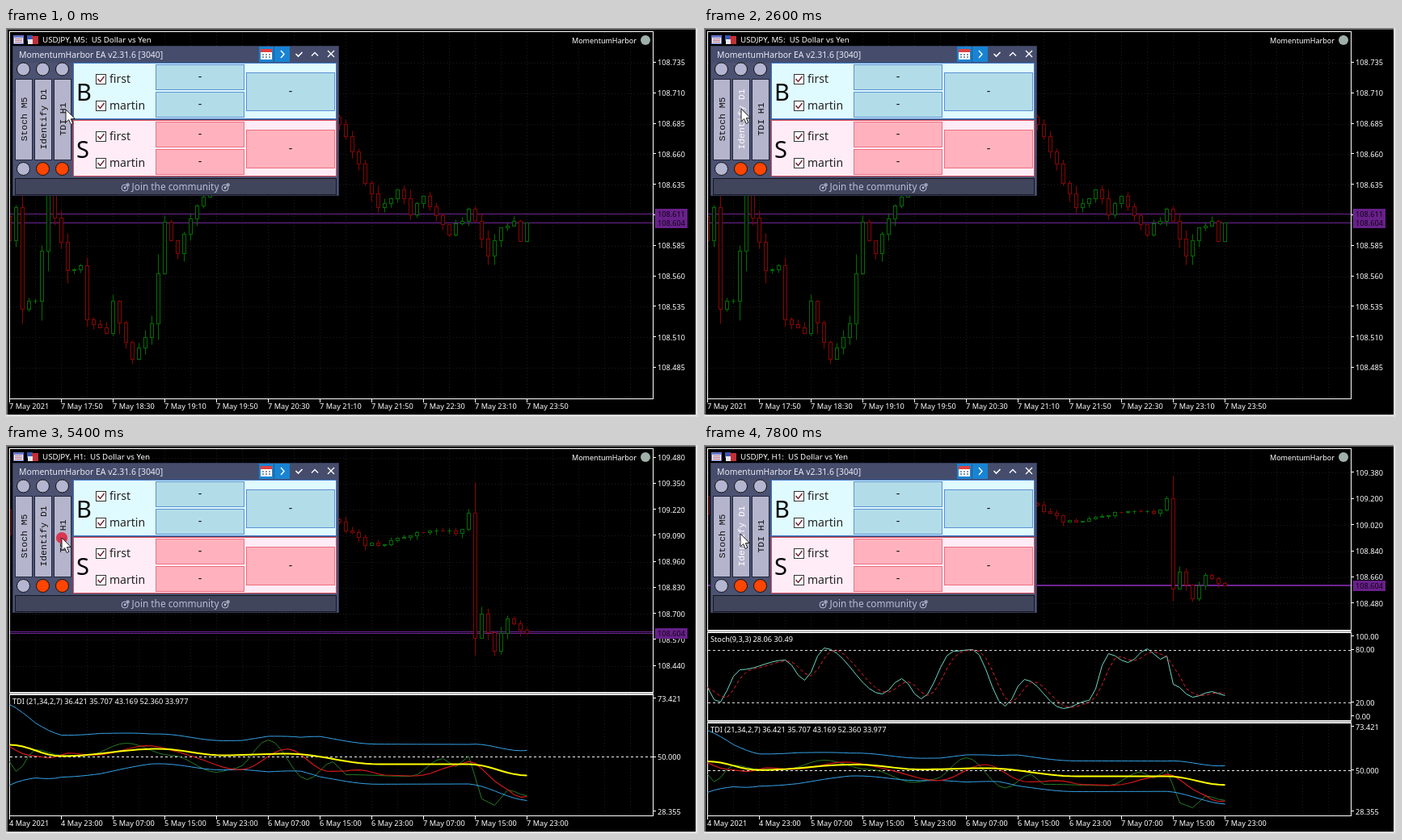
Write an HTML page with a canvas that moves like this. It is 856 by 482 pixels and loops after 8000 ms.

```html
<!DOCTYPE html>
<html lang="en">
<head>
<meta charset="utf-8">
<title>Indicator tabs</title>
<style>
html, body { margin: 0; width: 100%; height: 100%; overflow: hidden; background: #000; }
canvas { display: block; }
</style>
</head>
<body>
<canvas id="stage" width="856" height="482"></canvas>
<script>
const ctx = document.getElementById('stage').getContext('2d');
const LOOP = 8000, STEP = 200, RIGHT = 800, BOTTOM = 459, BARS = 81;
const BID = 108.604, ASK = 108.611;
const SANS = '"Noto Sans", "Open Sans", sans-serif';
const MONO = '"Liberation Mono", monospace';

const linear = k => k;
const wave = k => (1 - Math.cos(Math.PI * k)) / 2;

// One level per bar, eased between key points given as bar, level, bar, level ...
function curve(keys, ease = wave) {
  return Array.from({ length: BARS }, (_, bar) => {
    let i = 0;
    while (keys[i + 2] < bar) i += 2;
    const [b0, y0, b1, y1] = keys.slice(i, i + 4);
    return y0 + (y1 - y0) * ease((bar - b0) / (b1 - b0));
  });
}
const average = (ys, n, before = ys[0]) => ys.map((_, i) => {
  let sum = 0;
  for (let k = 0; k < n; k++) sum += ys[i - k] ?? before;
  return sum / n;
});

function makeCandles(keys, seed) {
  const random = () => (seed = seed * 16807 % 2147483647) / 2147483647;
  const closes = curve(keys, linear).map((y, bar) => {
    const isKey = keys.some((k, i) => i % 2 === 0 && k === bar);
    return isKey ? y : y + (random() - 0.5) * 10;
  });
  return closes.map((close, i) => {
    const open = closes[i - 1] ?? close - 30;
    const reach = 5 + Math.abs(close - open) * 0.35;
    const high = Math.min(open, close) - random() * reach;
    const low = Math.max(open, close) + random() * reach;
    return { open, close, high, low };
  });
}

// Levels are pixels on a scale of `unit` pixels per price unit, with the bid at `bid`
const charts = {
  M5: {
    title: 'M5', bid: 241, unit: 1512, start: Date.UTC(2021, 4, 7, 17, 10), minutes: 40,
    candles: makeCandles([0, 263, 1, 222, 2, 348, 4, 338, 6, 205, 9, 300, 11, 294, 12, 361, 15, 378, 16, 338, 19, 410,
      22, 366, 24, 240, 26, 279, 28, 236, 40, 60, 51, 119, 57, 222, 60, 200, 62, 231, 64, 208, 68, 256, 71, 224, 74, 282, 76, 247, 78, 239, 79, 264, 80, 241], 7)
  },
  D1: {
    title: 'Daily', bid: 151, unit: 57.14, start: Date.UTC(2021, 0, 15), minutes: 0,
    candles: makeCandles([0, 424, 4, 441, 7, 434, 10, 375, 13, 355, 15, 330, 17, 383, 20, 365, 22, 297, 26, 350,
      29, 290, 33, 243, 36, 180, 51, 84, 53, 38, 55, 48, 58, 90, 62, 108, 66, 175, 70, 192, 72, 147, 76, 108, 79, 124, 80, 151], 11)
  },
  H1: {
    title: 'H1', bid: 233, unit: 248, start: Date.UTC(2021, 4, 4, 15), minutes: 480,
    candles: makeCandles([0, 110, 51, 95, 55, 124, 59, 118, 65, 106, 70, 104, 71, 84, 72, 239, 73, 209, 75, 255, 77, 215, 80, 233], 5)
  }
};
const trend = average(charts.D1.candles.map(c => c.close), 4);

const stoch = {
  M5: { top: 309, height: 150, caption: '53.79 54.75',
    main: curve([0, 442, 3, 446, 9, 367, 14, 438, 17, 422, 19, 436, 24, 313, 26, 327, 28, 317, 37, 410, 40, 381, 43, 419,
      48, 349, 51, 371, 55, 450, 58, 450, 61, 431, 63, 430, 64, 406, 66, 412, 67, 440, 69, 436, 72, 386, 75, 446, 78, 370, 79, 382, 80, 378]) },
  H1: { top: 232, height: 109, caption: '28.06 30.49',
    main: curve([0, 300, 1.5, 320, 5, 278, 12, 266, 15, 291, 18, 251, 27, 308, 30, 289, 33, 314, 38, 255, 41, 253,
      46, 323, 49, 290, 55, 326, 59, 316, 62, 258, 65, 269, 68, 252, 70, 265, 71, 261, 72, 296, 75, 312, 78, 305, 80, 310]) }
};

const rsi = curve([0, 392, 1, 404, 4, 377, 8, 384, 12, 384, 18, 369, 25, 384, 32, 405, 35, 400, 40, 365, 46, 414,
  50, 392, 52, 408, 62, 410, 67, 388, 69, 398, 71, 385, 73, 438, 75, 446, 77, 427, 80, 434]);
const base = curve([0, 371, 8, 385, 23, 376, 33, 384, 43, 382, 57, 395, 71, 395, 80, 409]);
const spread = curve([0, 50, 4, 34, 8, 26, 14, 25, 22, 18.5, 36, 18, 40, 22, 45, 21, 48, 25, 71, 24.5, 80, 31], linear);
const tdi = [
  ['#267a26', 1, rsi],
  ['#35a4ea', 1, base.map((y, i) => y - spread[i])],
  ['#35a4ea', 1, base.map((y, i) => y + spread[i])],
  ['#d01818', 1.2, average(rsi, 7, 370)],
  ['#ffff00', 2, base]
];

const scales = {
  M5full: { bid: 241, unit: 1512, top: 108.735, step: 0.025 },
  M5sub: { bid: 161, unit: 943, top: 108.765, step: 0.035 },
  D1full: { bid: 151, unit: 57.14, top: 111.06, step: 0.56 },
  H1full: { bid: 349, unit: 374, top: 109.4, step: 0.1 },
  H1sub: { bid: 233, unit: 248, top: 109.48, step: 0.13 },
  H1two: { bid: 174, unit: 180, top: 109.38, step: 0.18 }
};

const scenes = [
  { from: 0, name: 'M5', scale: 'M5full' },
  { from: 800, name: 'M5', scale: 'M5sub', stoch: true },
  { from: 1600, name: 'M5', scale: 'M5full' },
  { from: 3000, name: 'D1', scale: 'D1full', trend: true },
  { from: 3800, name: 'D1', scale: 'D1full' },
  { from: 4600, name: 'H1', scale: 'H1sub', tdi: true },
  { from: 5600, name: 'H1', scale: 'H1full' },
  { from: 6600, name: 'M5', scale: 'M5sub', stoch: true },
  { from: 7400, name: 'H1', scale: 'H1two', stoch: true, tdi: true }
];
const stops = [
  { arrive: 0, leave: 0, x: 74, y: 101 },
  { arrive: 600, leave: 1800, x: 18, y: 100 },
  { arrive: 2200, leave: 3800, x: 46, y: 100 },
  { arrive: 4400, leave: 5700, x: 69, y: 115 },
  { arrive: 6400, leave: 6680, x: 27, y: 115 },
  { arrive: 7150, leave: 7400, x: 69, y: 113 },
  { arrive: 7800, leave: LOOP, x: 45, y: 110 }
];
const clicks = [800, 1500, 2900, 3480, 4500, 5340, 6430, 7300];

function text(str, x, y, size = 9.2, color = '#fff', align = 'left', family = SANS) {
  ctx.font = `${size}px ${family}`;
  ctx.textAlign = align;
  ctx.fillStyle = color;
  ctx.fillText(str, x, y);
}
function box(x, y, w, h, fill, stroke) {
  ctx.fillStyle = fill;
  ctx.fillRect(x, y, w, h);
  if (!stroke) return;
  ctx.strokeStyle = stroke;
  ctx.lineWidth = 1;
  ctx.strokeRect(x + 0.5, y + 0.5, w - 1, h - 1);
}
function poly(points, color, width = 1, dash = []) {
  ctx.beginPath();
  for (let i = 0; i < points.length; i += 2) ctx.lineTo(points[i], points[i + 1]);
  ctx.strokeStyle = color;
  ctx.lineWidth = width;
  ctx.setLineDash(dash);
  ctx.stroke();
  ctx.setLineDash([]);
}
function disc(x, y, r, fill, stroke) {
  ctx.beginPath();
  ctx.arc(x, y, r, 0, 7);
  if (fill) { ctx.fillStyle = fill; ctx.fill(); }
  if (stroke) { ctx.strokeStyle = stroke; ctx.lineWidth = 1; ctx.stroke(); }
}
const barX = bar => 4.5 + bar * 8;
const snap = y => Math.round(y) + 0.5;
const level = (y, color, dash) => poly([5, snap(y), RIGHT, snap(y)], color, 1, dash);
const series = (ys, mapY, color, width, dash) =>
  poly(ys.flatMap((y, bar) => [barX(bar), mapY(y) + 0.5]), color, width, dash);

function axisLabel(str, y) {
  poly([RIGHT, snap(y) - 1, RIGHT + 4, snap(y) - 1], '#fff');
  text(str, 806, y + 3.5);
}

function drawCandles(chart, scale, bottom) {
  const mapY = y => snap(scale.bid + (y - chart.bid) * scale.unit / chart.unit);
  ctx.save();
  ctx.beginPath();
  ctx.rect(5, 5, RIGHT - 5, bottom - 5);
  ctx.clip();
  chart.candles.forEach(({ open, close, high, low }, bar) => {
    const x = barX(bar), top = mapY(Math.min(open, close));
    const height = mapY(Math.max(open, close)) - top;
    poly([x, mapY(high), x, mapY(low)], close < open ? '#046c04' : '#860606');
    ctx.fillStyle = '#000';
    ctx.fillRect(x - 2, top, 4, height);
    ctx.strokeRect(x - 2, top, 4, height);
  });
  ctx.restore();
}

function drawTrend() {
  for (let bar = 1; bar < BARS; bar++) {
    const y0 = trend[bar - 1], y1 = trend[bar];
    poly([barX(bar - 1), y0, barX(bar), y1], y1 < y0 ? '#00f' : '#f00', 3);
  }
}

function frame(top, bottom) {
  ctx.strokeStyle = '#fff';
  ctx.lineWidth = 1;
  ctx.strokeRect(4.5, top + 0.5, RIGHT - 4, bottom - top);
}
function subPane(top, bottom) {
  box(4, top - 2, RIGHT - 3, 2, '#bbb');
  frame(top, bottom);
}

function stochPane(data, top, bottom) {
  const height = bottom - top;
  const mapY = y => top + (y - data.top) * height / data.height;
  subPane(top, bottom);
  [80, 20].forEach(v => {
    const y = bottom - v / 100 * height;
    level(y, '#ddd', [3, 3]);
    axisLabel(v + '.00', y);
  });
  axisLabel('100.00', top + 5);
  axisLabel('0.00', bottom - 5);
  series(data.main, mapY, '#72d8c4');
  series(average(data.main, 3), mapY, '#e02030', 1, [4, 3]);
  text('Stoch(9,3,3) ' + data.caption, 8, top + 12);
}

function tdiPane(top, bottom) {
  const mapY = y => top + (y - 309) * (bottom - top) / 150;
  subPane(top, bottom);
  level(mapY(386), '#fff', [3, 3]);
  axisLabel('73.421', top + 5);
  axisLabel('50.000', mapY(386.5));
  axisLabel('28.355', bottom - 5);
  tdi.forEach(([color, width, ys]) => series(ys, mapY, color, width));
  text('TDI (21,34,2,7) 36.421 35.707 43.169 52.360 33.977', 8, top + 12);
}

// Labels stand eight bars apart; the daily chart counts weekdays only
function timeLabels({ start, minutes }) {
  const date = new Date(start);
  return Array.from({ length: 11 }, (_, i) => {
    const day = `${date.getUTCDate()} ${date.toLocaleString('en-US', { month: 'short', timeZone: 'UTC' })} `;
    const label = day + (i && minutes ? date.toISOString().slice(11, 16) : '2021');
    if (minutes) date.setTime(+date + minutes * 60000);
    else for (let n = 0; n < 8;) {
      date.setUTCDate(date.getUTCDate() + 1);
      if (date.getUTCDay() % 6) n++;
    }
    return label;
  });
}

function priceTag(price, y) {
  box(803, Math.round(y) - 6, 40, 13, '#68208a');
  text(price.toFixed(3), 806, y + 3.5, 9.2, '#100514');
}

function drawChart(scene) {
  const chart = charts[scene.name], scale = scales[scene.scale];
  const bottom = scene.stoch && scene.tdi ? 229 : scene.stoch || scene.tdi ? 306 : BOTTOM;
  const priceY = price => scale.bid + (BID - price) * scale.unit;
  for (let x = 36.5; x < RIGHT; x += 32) poly([x, 5, x, BOTTOM], '#1c1c1c', 1, [1, 3]);
  for (let price = scale.top; priceY(price) < bottom - 10; price -= scale.step) {
    level(priceY(price), '#1c1c1c', [1, 3]);
    axisLabel(price.toFixed(3), priceY(price));
  }
  if (scene.name !== 'D1') level(priceY(ASK), '#702494');
  level(scale.bid, '#702494');
  drawCandles(chart, scale, bottom);
  if (scene.trend) drawTrend();
  if (scene.name === 'M5') priceTag(ASK, priceY(ASK));
  priceTag(BID, scale.bid);

  frame(4, bottom);
  if (scene.stoch) stochPane(stoch[scene.name], bottom + 3, scene.tdi ? 341 : BOTTOM);
  if (scene.tdi) tdiPane(scene.stoch ? 344 : bottom + 3, BOTTOM);

  timeLabels(chart).forEach((label, i) => {
    const x = 4 + i * 64;
    poly([x + 0.5, BOTTOM, x + 0.5, BOTTOM + 5], '#fff');
    text(label, x, 472);
  });
  text(`USDJPY, ${chart.title}:\u00a0 US Dollar vs Yen`, 45, 18, 9.8);
  text('MomentumHarbor', 780, 19, 9, '#fff', 'right');
}

function cornerIcons() {
  box(9, 9, 13, 11, '#f4f4ff', '#6878c8');
  box(10, 10, 11, 2, '#6878c8');
  for (let y = 13.5; y < 19; y += 2) poly([11, y, 20, y], '#b06878');
  box(26, 9, 7, 7, '#3458b8');
  box(32, 10, 8, 10, '#c03038');
  box(27, 14, 6, 6, '#e8e8f0');
  disc(791, 15, 6, '#9fb0a8');
}

function checkbox(label, y) {
  box(111, y - 6, 13, 13, '#fff', '#333');
  poly([113.5, y, 116.5, y + 3.5, 121.5, y - 3], '#702030', 1.4);
  text(label, 128, y + 5, 14, '#222');
}

function section(letter, top, fill, edge, button, buttonEdge) {
  box(83, top, 326, 70, fill, edge);
  text(letter, 87, top + 47, 29, '#000');
  checkbox('first', top + 20);
  checkbox('martin', top + 53);
  [[185, 2, 32], [185, 36, 32], [297, 12, 48]].forEach(([x, dy, h]) => {
    box(x, top + dy, 110, h, button, buttonEdge);
    text('-', x + 55, top + dy + h / 2 + 4, 14, '#111', 'center');
  });
}

function joinIcon(x) {
  disc(x, 198, 4, null, '#b8bcd6');
  disc(x, 198, 1.4, '#b8bcd6');
  poly([x, 198, x + 5, 193, x + 5, 196, x + 2, 193, x + 5, 193], '#b8bcd6');
}

function panel(hovered) {
  box(8, 22, 404, 186, '#4c5272', '#343a56');
  box(9, 23, 402, 20, '#464d6c');
  text('MomentumHarbor EA v2.31.6 [3040]', 16, 37, 10.4, '#e8eaf4');
  box(313, 23, 18, 19, '#1784d4');
  box(315, 26, 14, 13, '#fff');
  box(315, 26, 14, 4, '#e04040');
  for (let i = 0; i < 6; i++) box(317 + i % 3 * 4, 32 + (i / 3 | 0) * 3, 2, 2, '#8898a8');
  box(332, 23, 19, 19, '#1784d4');
  poly([340, 28, 344, 32.5, 340, 37], '#fff', 1.4);
  poly([358.5, 32, 361.5, 35, 366.5, 30], '#fff', 1.6);
  poly([378, 34.5, 382, 30.5, 386, 34.5], '#fff', 1.4);
  poly([398, 28, 406, 36], '#fff', 1.3);
  poly([406, 28, 398, 36], '#fff', 1.3);

  ['Stoch M5', 'Identify D1', 'TDI H1'].forEach((label, i) => {
    const x = 21.5 + i * 24;
    disc(x, 51, 8, '#b4b5d0', '#111');
    disc(x, 174.5, 8, i ? '#ff4500' : '#b4b5d0', '#111');
    box(x - 10.5, 63, 22, 101, '#b4b5cc', '#22263a');
    ctx.save();
    ctx.translate(x + 4, 113);
    ctx.rotate(-Math.PI / 2);
    text(label, 0, 0, 11.4, i === hovered ? '#fff' : '#111', 'center', MONO);
    ctx.restore();
  });
  section('B', 43, '#e0fbff', '#3c78c8', '#b2dde8', '#5c90d4');
  section('S', 114, '#ffecf6', '#e05060', '#ffb2be', '#ee7080');
  box(11, 186, 398, 21, '#41455c', '#15171f');
  text('Join the community', 209.5, 201, 11.8, '#b8bcd6', 'center');
  joinIcon(147);
  joinIcon(271);
}

function pointerAt(t) {
  const i = stops.findLastIndex(s => s.arrive <= t);
  const a = stops[i], b = stops[i + 1] || a;
  const k = t <= a.leave ? 0 : wave((t - a.leave) / (b.arrive - a.leave));
  return [a.x + (b.x - a.x) * k, a.y + (b.y - a.y) * k];
}

function pointer(x, y) {
  ctx.save();
  ctx.translate(x, y);
  ctx.beginPath();
  [[0, 0], [0, 16], [3.7, 12.6], [6.2, 18.5], [8.8, 17.3], [6.3, 11.7], [11.2, 11.4]].forEach(p => ctx.lineTo(...p));
  ctx.closePath();
  ctx.fillStyle = '#fff';
  ctx.fill();
  ctx.strokeStyle = '#222';
  ctx.lineWidth = 1;
  ctx.stroke();
  ctx.restore();
}

function ripple(start, t) {
  const age = t - start, life = 480;
  if (age < 0 || age > life) return;
  disc(...pointerAt(start), 5 + age * 0.035, `rgba(222, 40, 66, ${0.9 * (1 - (age / life) ** 2)})`);
}

function draw(t) {
  box(0, 0, 856, 482, '#000');
  drawChart(scenes.findLast(s => s.from <= t));
  cornerIcons();
  box(0, 0, 856, 2, '#777');
  box(0, 0, 2, 482, '#777');
  box(853, 0, 3, 482, '#ddd');
  box(0, 479, 856, 3, '#ddd');

  const [x, y] = pointerAt(t);
  const pressed = clicks.some(c => t >= c && t - c < 150);
  panel(pressed ? -1 : [[10, 34], [35, 57], [59, 72]].findIndex(([a, b]) => x >= a && x <= b));
  clicks.forEach(start => ripple(start, t));
  pointer(x, y);
}

let shown = -1;
function tick(now) {
  const t = Math.floor(now % LOOP / STEP) * STEP;
  if (t !== shown) draw(shown = t);
  requestAnimationFrame(tick);
}
requestAnimationFrame(tick);
</script>
</body>
</html>
```
